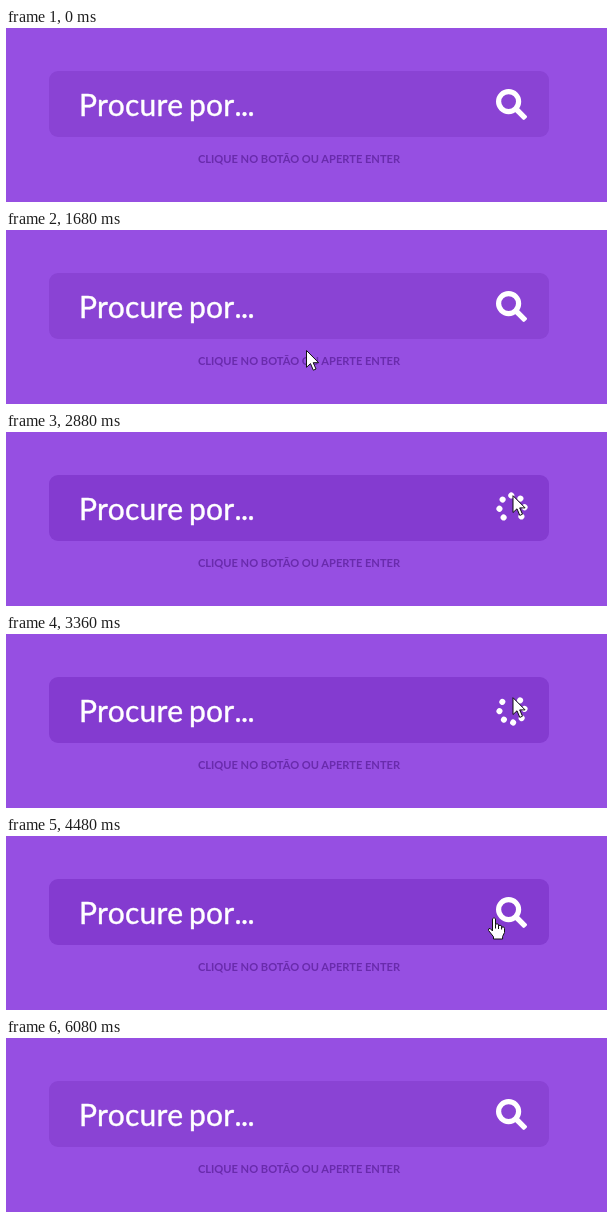
Write an HTML page that moves like this. It is 601 by 174 pixels and loops after 6160 ms.

```html
<!DOCTYPE html>
<html lang="pt-BR">
<head>
<meta charset="utf-8">
<title>Busca</title>
<style>
  html, body { margin: 0; width: 100%; height: 100%; overflow: hidden; background: #964fe2; }
  svg { display: block; width: 100%; height: 100%; }
  text { font-family: Lato, sans-serif; }
  .query { font-size: 30px; letter-spacing: .3px; word-spacing: -2.4px; fill: #fff; stroke: #fff; stroke-width: .4; }
  .dots { letter-spacing: -.6px; }
  .hint { font-size: 11.1px; font-weight: 700; fill: #692bac; text-anchor: middle; }
  .cursor { fill: #fff; stroke: #111; stroke-linejoin: round; }
</style>
</head>
<body>
<svg viewBox="0 0 601 174">
  <rect width="601" height="174" fill="#964fe2"/>
  <rect id="bar" x="43" y="43" width="500" height="66" rx="9"/>
  <text class="query" x="73" y="88">Procure por<tspan class="dots">...</tspan></text>
  <text class="hint" x="293" y="135">CLIQUE NO BOTÃO OU APERTE ENTER</text>

  <g id="lens" transform="translate(502.6 73.6) rotate(45)" fill="#fff">
    <circle r="10" fill="none" stroke="#fff" stroke-width="5.2"/>
    <rect x="10.5" y="-2.7" width="13.6" height="5.4" rx="1.4"/>
  </g>
  <g id="spinner" fill="#fff"></g>

  <g id="pointer" class="cursor">
    <path id="arrow" d="M.5 .5V17.3L4.5 13.6 7.3 20.2 10 19 7.2 12.7H12.6z"/>
    <g id="hand">
      <path d="M-1.5 13V1Q0-2 1.5 1V6.5Q3 5 4.5 6.5V7.8Q6 6.5 7.7 8V9.2Q10.5 8 10.5 10.5V14.5L8.6 18.5V21H-.5V18.8L-5.4 12.5Q-6 10.4-4 10.4z"/>
      <path d="M1.5 6.5V10.5M4.5 7.5V11M7.6 8.8V11.5" fill="none"/>
    </g>
  </g>
</svg>
<script>
const LOOP = 6160, STEP = 80, FADE = 200;
const SPIN_FROM = 2560, SPIN_TO = 4080, SPIN_ZERO = 2525, SPIN_PERIOD = 970;

// the pointer rests between these moves
const START = { x: 203, y: 176 };
const MOVES = [
  { from: 400, to: 720, x: 211, y: 144 },
  { from: 1200, to: 1680, x: 300, y: 120 },
  { from: 1760, to: 2240, x: 506.5, y: 63.2 },
  { from: 4240, to: 4480, x: 488, y: 82 },
  { from: 4560, to: 5040, x: 213, y: 162 },
  { from: 5040, to: 5520, x: 206, y: 176 }
];

const el = id => document.getElementById(id);
const [bar, lens, spinner, pointer, arrow, hand] =
  ['bar', 'lens', 'spinner', 'pointer', 'arrow', 'hand'].map(el);
const mix = (a, b, k) => a + (b - a) * k;
const ramp = (t, from, to) => Math.min(1, Math.max(0, (t - from) / (to - from)));
const ease = k => k * k * (3 - 2 * k);
const show = (node, on) => node.setAttribute('visibility', on ? 'visible' : 'hidden');

// seven dots on a ring of eight places, the upper right one is empty
for (let i = 0; i < 7; i++) {
  const a = i * Math.PI / 4;
  const dot = document.createElementNS('http://www.w3.org/2000/svg', 'circle');
  dot.setAttribute('cx', 12.6 * Math.cos(a));
  dot.setAttribute('cy', 12.6 * Math.sin(a));
  dot.setAttribute('r', 3);
  spinner.append(dot);
}

function tipAt(t) {
  return MOVES.reduce((p, m) => {
    const k = ease(ramp(t, m.from, m.to));
    return { x: mix(p.x, m.x, k), y: mix(p.y, m.y, k) };
  }, START);
}

function draw(t) {
  const loading = t >= SPIN_FROM && t < SPIN_TO;
  show(lens, !loading);
  show(spinner, loading);
  const turn = (t - SPIN_ZERO) / SPIN_PERIOD * 360;
  spinner.setAttribute('transform', `translate(506 76) rotate(${turn})`);

  const dark = ramp(t, 1860, 1860 + FADE) - ramp(t, 4740, 4740 + FADE);
  bar.setAttribute('fill', `rgb(${mix(138, 132, dark)} ${mix(67, 59, dark)} ${mix(212, 208, dark)})`);

  const { x, y } = tipAt(t);
  const onButton = x > 484 && y < 100 && !loading;
  const seen = y < 174;
  pointer.setAttribute('transform', `translate(${x} ${y})`);
  show(arrow, seen && !onButton);
  show(hand, seen && onButton);
}

const start = performance.now();
function tick() {
  const t = (performance.now() - start) % LOOP;
  draw(Math.floor(t / STEP) * STEP);
  requestAnimationFrame(tick);
}
draw(0);
requestAnimationFrame(tick);
</script>
</body>
</html>
```
